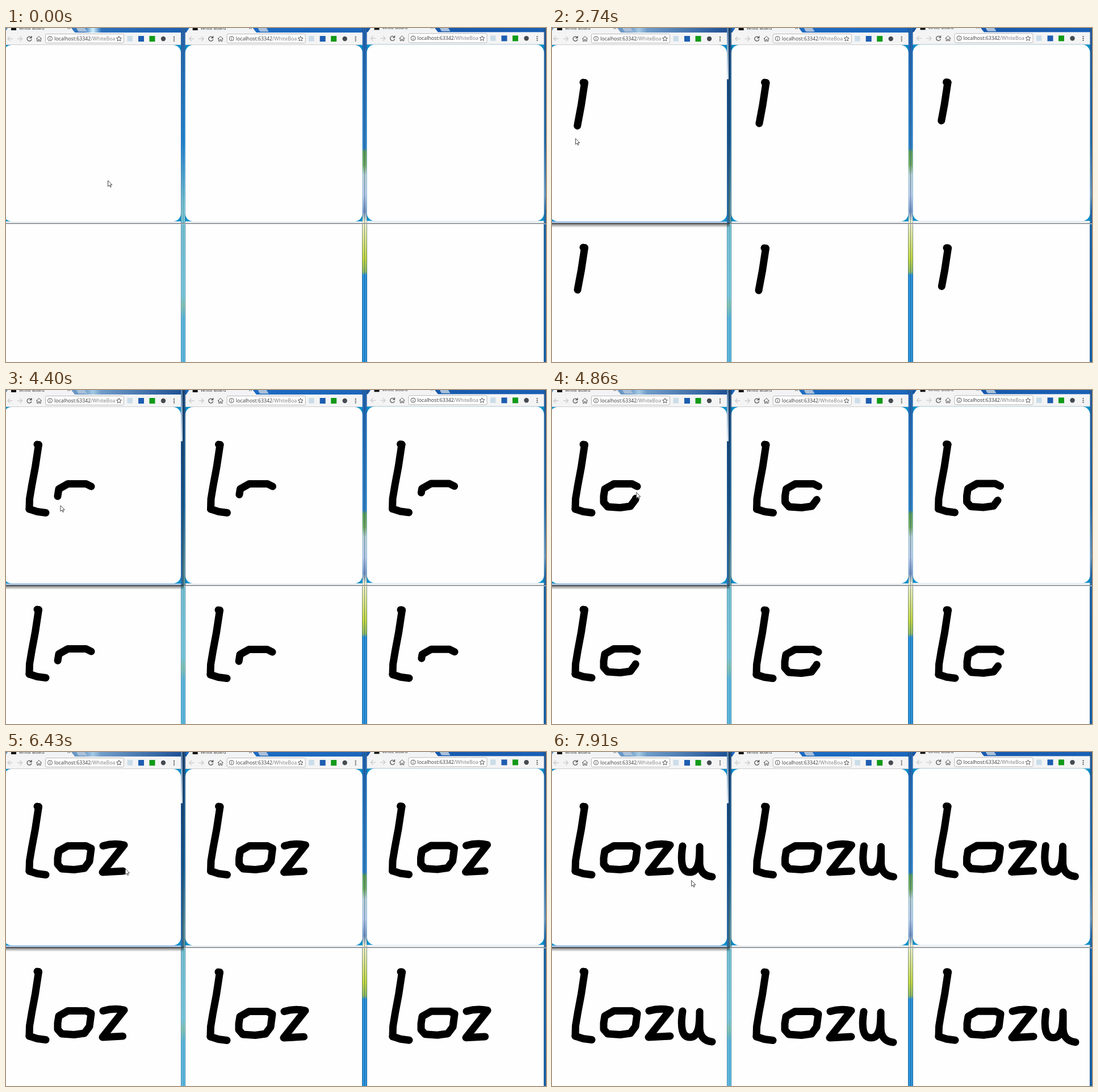
These frames come from a looping animation (951x589 px, 8 s). An HTML page:

```html
<!DOCTYPE html>
<html lang="en">
<head>
<meta charset="utf-8">
<title>White Board</title>
<style>
  html, body { margin: 0; width: 100%; height: 100%; overflow: hidden; background: #fff; }
  svg { display: block; width: 951px; height: 589px; }
  text { font-family: "Noto Sans", "Open Sans", sans-serif; }
  .icon { fill: none; stroke: #555; stroke-width: 1.3; }
  .thin { stroke-width: 1; }
  .ink { fill: none; stroke: #000; stroke-width: 13; stroke-linecap: round; stroke-linejoin: round; }
</style>
</head>
<body>
<svg viewBox="0 0 951 589">
  <defs>
    <linearGradient id="bar">
      <stop offset="0" stop-color="#3f83c6"/><stop offset=".33" stop-color="#1a5fb2"/>
      <stop offset=".34" stop-color="#1c6ec6"/><stop offset=".66" stop-color="#1c66bb"/>
      <stop offset=".67" stop-color="#1555a8"/><stop offset="1" stop-color="#1a60b5"/>
    </linearGradient>
    <linearGradient id="barOn">
      <stop offset="0" stop-color="#5d8fc0"/><stop offset=".55" stop-color="#6f9bc8"/><stop offset="1" stop-color="#1c4f94"/>
    </linearGradient>
    <linearGradient id="glow">
      <stop offset="0" stop-color="#d5f2fc" stop-opacity="0"/><stop offset=".5" stop-color="#d5f2fc"/>
      <stop offset="1" stop-color="#d5f2fc" stop-opacity="0"/>
    </linearGradient>
    <linearGradient id="under" x2="0" y2="1">
      <stop offset="0" stop-opacity=".6"/><stop offset="1" stop-opacity="0"/>
    </linearGradient>
    <linearGradient id="side">
      <stop offset="0" stop-opacity=".45"/><stop offset="1" stop-opacity="0"/>
    </linearGradient>
    <linearGradient id="edgeOn" x2="0" y2="1">
      <stop offset="0" stop-color="#5580ad"/><stop offset=".26" stop-color="#dfe9f2"/>
      <stop offset=".265" stop-color="#15497f"/><stop offset="1" stop-color="#2b6ca6"/>
    </linearGradient>

    <g id="win">
      <path d="M-3 9L3 0H115L122 9Z" fill="#f2f3f4"/>
      <path d="M124 0H139L143 6.5H129Q127 6.5 126 4Z" fill="#a9c0da"/>
      <rect x="9" y="-5" width="9" height="9" fill="#111"/>
      <text x="23" y="2.6" font-size="7.7" fill="#333">White Board</text>
      <path d="M108.500 -3L113 2M113 -3L108.500 2" class="icon thin"/>
      <rect x="-4" y="8" width="312" height="22" fill="#f4f4f5"/>
      <path d="M11.500 19H3.500M7 15L3 19L7 23M20 19H28M24.500 15L28.500 19L24.500 23" class="icon" style="stroke:#ccc"/>
      <path d="M44.200 16.500A4 4 0 1 0 45 20M45 14V17.500H41.500" class="icon"/>
      <path d="M53 19.300L58 14.600L63 19.300M54.800 18V23.300H57V20.500H59V23.300H61.200V18" class="icon thin"/>
      <rect x="69.500" y="10.500" width="138" height="16" rx="2" fill="#fff" stroke="#b8b8b8"/>
      <circle cx="77.500" cy="18.700" r="4" class="icon thin"/>
      <path d="M77.500 18V21M77.500 16V17" class="icon thin"/>
      <text x="85" y="21.800" font-size="8.75" fill="#444">localhost:63342<tspan fill="#858585">/WhiteBoa</tspan></text>
      <path d="M199 14.500L200.300 17.400L203.400 17.700L201 19.800L201.800 22.900L199 21.200L196.200 22.900L197 19.800L194.600 17.700L197.700 17.400Z" class="icon thin"/>
      <rect x="213.500" y="14" width="9.500" height="9.500" fill="#cbdde9"/>
      <rect x="233" y="14" width="10" height="10" fill="#1d5db0"/>
      <rect x="252.500" y="14" width="10" height="10" fill="#129a19"/>
      <circle cx="277" cy="19" r="4.200" fill="#454b50"/>
      <path d="M296 15V23.500" stroke="#555" stroke-width="2" stroke-dasharray="2 1.400"/>
      <path d="M-4 29.500H308" stroke="#c9ccd0"/>
      <rect x="-4" y="30" width="312" height="311" fill="#0b90ca"/>
      <rect x="-4" y="30" width="312" height="311" rx="14" fill="#fefefe"/>
      <rect x="-4" y="341" width="312" height="3" fill="#edf0f4"/>
    </g>
  </defs>

  <rect width="951" height="9" fill="url(#bar)"/>
  <rect x="138" width="30" height="8" fill="url(#glow)"/>
  <g class="active">
    <rect width="311" height="9" fill="url(#barOn)"/>
    <rect x="138" width="30" height="8" fill="url(#glow)" opacity=".55"/>
  </g>
  <g id="gaps"></g>
  <use href="#win"/>
  <use href="#win" x="319.700"/>
  <use href="#win" x="639.500" y="-.7"/>
  <path d="M0 346H308V589H0ZM316 346H627V589H316ZM637 346H947V589H637Z" fill="#fefefe"/>
  <path d="M0 344.500H951" stroke="#74797e"/>
  <path d="M0 345.500H951" stroke="#c4c7ca"/>
  <g class="active">
    <rect y="341" width="310" height="2.500" fill="#9dbfe2"/>
    <rect x="308" width="3" height="344" fill="url(#edgeOn)"/>
    <rect x="311" width="7" height="345" fill="url(#side)"/>
    <rect y="344" width="313" height="8" fill="url(#under)"/>
  </g>
  <g id="boards"></g>
  <path id="cursor" d="M0 0V10.300L2.400 8.200L4.100 11.800L5.700 11L4.100 7.600H7.300Z" fill="#fff" stroke="#333" stroke-width=".9"/>
</svg>
<script>
const LOOP = 8000, FOCUS = 1480;
const STEP = 135;   // ms between screen updates
const LEAD = 90;    // ms the pointer runs ahead of the ink
const TRAVEL = 700; // longest pointer trip between strokes
const $ = id => document.getElementById(id);

function add(parent, tag, attrs) {
  const el = document.createElementNS("http://www.w3.org/2000/svg", tag);
  for (const k in attrs) el.setAttribute(k, attrs[k]);
  return parent.appendChild(el);
}

// Desktop seen between the windows, as colours down the screen.
function gap(x, width, colors) {
  const id = "gap" + x;
  const grad = add($("gaps"), "linearGradient", { id, x2: 0, y2: 1 });
  for (const c of colors.split(" ")) {
    const [color, offset] = c.split("@");
    add(grad, "stop", { offset: offset + "%", "stop-color": color });
  }
  add($("gaps"), "rect", { x, width, height: 589, fill: `url(#${id})` });
  for (const seam of [0, width / 2 - .5, width - 1])
    add($("gaps"), "rect", { x: x + seam, width: 1, height: 589, fill: "#17405f", opacity: .5 });
}
gap(308, 8, "#2b65ad@0 #2588d8@34 #80cbd9@53 #83d5ea@80 #8fd0bd@83 #62c2e9@87");
gap(627, 9, "#2163b0@0 #2f80c6@36 #5d9e58@37 #72aa63@41 #b9cfd6@44 #b8caea@50 #7595c5@55 #f1efcf@58 #c6d942@69 #91ba64@73 #2b93dc@74");
gap(947, 4, "#2a63ae@0 #2577c5@34 #8eb9e2@50 #2878c4@55 #1a70c8@100");

// Pointer moves; all but the first and last leave ink.
const moves = [
  [0, 140, "M179.5 269h.1"],
  [1440, 1850, "M55 96L57.5 96.5"],
  [2400, 2976, "M57.5 96.5L51.5 136 45.5 168 41.5 192 41 210"],
  [3400, 3600, "M41 210L55 214.5 70 216.5"],
  [3820, 5110, "M150 170L141 165.5H109L93 174.5 91 187V198L98 206 120 207.5 138 205 147 193 150 170"],
  [5632, 6500, "M171 165.5Q190 160 208 164L170 212 208 210"],
  [6780, 7750, "M230 166Q223 212 243 212C260 212 260 185 260 167V196Q261 218 282 220"],
  [7990, LOOP, "M245.5 226.5h.1"]
].map(([from, to, d]) => ({ from, to, d }));
const strokes = moves.slice(1, -1);

// One copy of the drawing per window: x, y, network delay.
const boards = [[0, 0, 0], [319.5, 0, 15], [639.5, -.5, 30], [0, 291, 6], [319, 292, 6], [640, 291.7, 30]]
  .map(([x, y, lag]) => {
    const g = add($("boards"), "g", { class: "ink", transform: `translate(${x} ${y})` });
    return { lag, paths: strokes.map(s => add(g, "path", { d: s.d, pathLength: 1 })) };
  });

for (const m of moves) {
  const guide = add($("gaps"), "path", { d: m.d, fill: "none" });
  const length = guide.getTotalLength();
  m.point = p => guide.getPointAtLength(p * length);
}

// The screen only updates in bursts, and rests between them.
const bursts = [[0, 0], [140, 800], [1480, 1850], [2500, 3010], [3410, 4400],
  [4560, 5490], [5640, 6570], [6690, 7620], [7760, 7910]];

function snap(t) {
  const [from, to] = bursts.findLast(b => b[0] <= t);
  if (t >= to) return to;
  const n = Math.round((to - from) / STEP);
  const step = (to - from) / n;
  return from + step * Math.min(n - 1, Math.floor((t - from + 16) / step));
}

const clamp = p => Math.min(1, Math.max(0, p));
const smooth = p => p * p * (3 - 2 * p);
const progress = (m, t) => smooth(clamp((t - m.from) / (m.to - m.from)));

function pointer(t) {
  const i = moves.findLastIndex(m => m.from <= t);
  const move = moves[i], next = moves[i + 1];
  const a = move.point(progress(move, t));
  if (t < move.to || !next) return [a.x, a.y];
  const b = next.point(0);
  const p = clamp((t - move.to) / Math.min(TRAVEL, next.from - move.to));
  return [a.x + (b.x - a.x) * p, a.y + (b.y - a.y) * p];
}

function drawInk(paths, t) {
  strokes.forEach((s, i) => {
    paths[i].setAttribute("visibility", t >= s.from ? "visible" : "hidden");
    paths[i].setAttribute("stroke-dasharray", Math.max(.001, progress(s, t)) + " 2");
  });
}

function draw(t) {
  const shown = snap(t);
  const idle = t - shown > 200;
  for (const { lag, paths } of boards) drawInk(paths, idle ? shown : shown - lag);
  $("cursor").setAttribute("transform", `translate(${pointer(shown + LEAD)})`);
  for (const el of document.querySelectorAll(".active"))
    el.setAttribute("visibility", t >= FOCUS ? "visible" : "hidden");
}

const start = performance.now();
function tick() {
  draw((performance.now() - start) % LOOP);
  requestAnimationFrame(tick);
}
tick();
</script>
</body>
</html>
```
